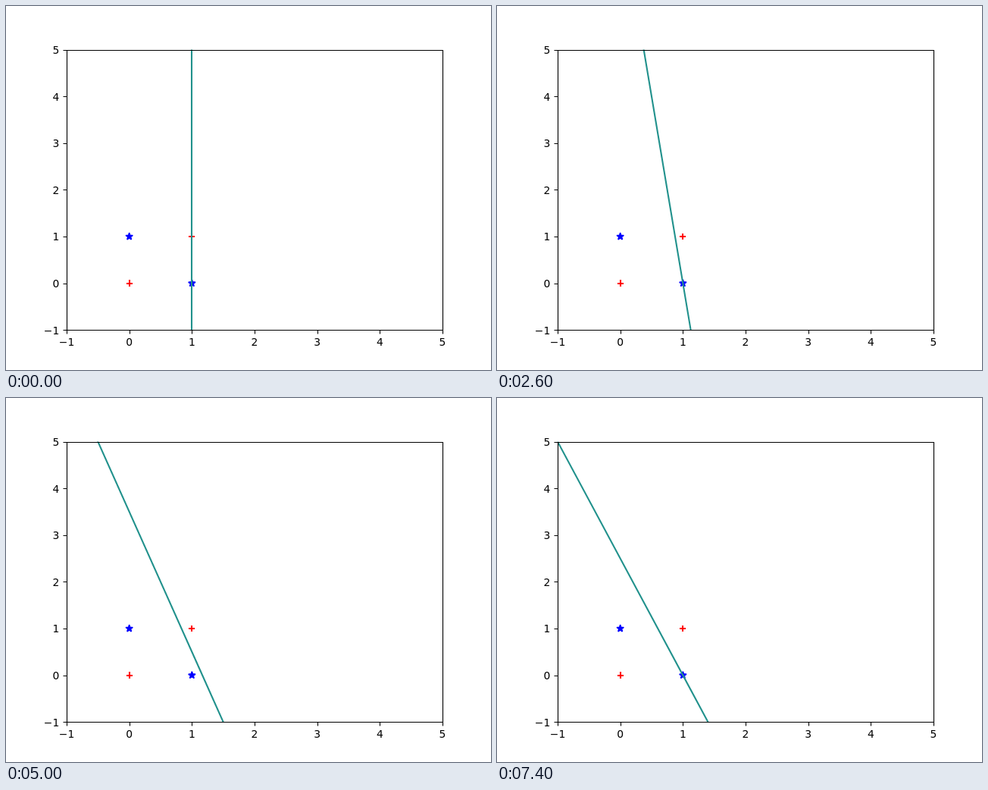
An HTML page that plays this animation: 640 px wide and 480 px high, repeating every 8000 ms.

```html
<!DOCTYPE html>
<html lang="en">
<head>
<meta charset="utf-8">
<title>Perceptron boundary</title>
<style>
  html, body { margin: 0; width: 100%; height: 100%; overflow: hidden; background: #fff; }
  svg { display: block; width: 640px; height: 480px; }
  text { font: 13.889px "DejaVu Sans", sans-serif; fill: #000; }
</style>
</head>
<body>
<svg id="plot" viewBox="0 0 640 480">
  <clipPath id="area"><path d="M80 57.6H576V427.2H80Z"/></clipPath>
</svg>
<script>
const STEP = 200, LOOP = 8000, MIN = -1, MAX = 5;
const LINE_WIDTH = 2.083, MARK = 4.16;
const svg = document.getElementById("plot");

// Samples in the order they are visited; label 1 is a plus, -1 a star.
const samples = [
  { x: 0, y: 0, label: 1 },
  { x: 1, y: 1, label: 1 },
  { x: 0, y: 1, label: -1 },
  { x: 1, y: 0, label: -1 }
];

const px = x => 80 + (x - MIN) * 496 / 6;
const py = y => 427.2 - (y - MIN) * 61.6;
const crisp = v => Math.floor(v + 0.5) + 0.5;

function add(tag, attrs, content = "") {
  const el = document.createElementNS("http://www.w3.org/2000/svg", tag);
  for (const key in attrs) el.setAttribute(key, attrs[key]);
  el.textContent = content;
  svg.appendChild(el);
  return el;
}

function drawPlus(cx, cy) {
  const r = Math.round;
  const d = `M${r(cx - MARK)} ${r(cy)}H${r(cx + MARK)}M${r(cx)} ${r(cy - MARK)}V${r(cy + MARK)}`;
  add("path", { d, fill: "none", stroke: "#f00", "stroke-width": LINE_WIDTH });
}

function drawStar(cx, cy) {
  const points = Array.from({ length: 10 }, (_, i) => {
    const r = i % 2 ? MARK * 0.382 : MARK;
    const a = i * Math.PI / 5;
    return `${cx + r * Math.sin(a)},${cy - r * Math.cos(a)}`;
  }).join(" ");
  add("polygon", { points, fill: "#00f", stroke: "#00f",
    "stroke-width": LINE_WIDTH, "stroke-linejoin": "round" });
}

function drawAxes() {
  const left = crisp(px(MIN)), right = crisp(px(MAX));
  const top = crisp(py(MAX)), bottom = crisp(py(MIN));
  let ticks = "";
  for (let v = MIN; v <= MAX; v++) {
    const label = String(v).replace("-", "\u2212");
    ticks += `M${crisp(px(v))} ${bottom}v5M${left} ${crisp(py(v))}h-5`;
    add("text", { x: px(v), y: 448, "text-anchor": "middle" }, label);
    add("text", { x: 70.3, y: Math.round(py(v) + 5.4), "text-anchor": "end" }, label);
  }
  add("path", { d: `M${left} ${top}H${right}V${bottom}H${left}Z${ticks}`,
    fill: "none", stroke: "#000", "stroke-width": 1.111 });
}

// Perceptron weights after n visits, in tenths.
function train(n) {
  let w1 = 10, w2 = 0, b = -10;
  for (let i = 0; i < n; i++) {
    const { x, y, label } = samples[i % 4];
    if (label * (w1 * x + w2 * y + b) <= 0) {
      w1 += label * x;
      w2 += label * y;
      b += label;
    }
  }
  return { w1, w2, b };
}

for (const { x, y, label } of samples) (label > 0 ? drawPlus : drawStar)(px(x), py(y));
const boundary = add("path", { fill: "none", stroke: "#21918c",
  "stroke-width": LINE_WIDTH, "clip-path": "url(#area)" });
drawAxes();

function render(time) {
  const { w1, w2, b } = train(Math.floor(time % LOOP / STEP));
  const at = y => {
    const x = px(-(w2 * y + b) / w1);
    return `${w2 ? x : Math.round(x)} ${py(y)}`;
  };
  boundary.setAttribute("d", `M${at(MIN - 1)}L${at(MAX + 1)}`);
}

const start = performance.now();
function tick() {
  render(performance.now() - start);
  requestAnimationFrame(tick);
}
tick();
</script>
</body>
</html>
```
